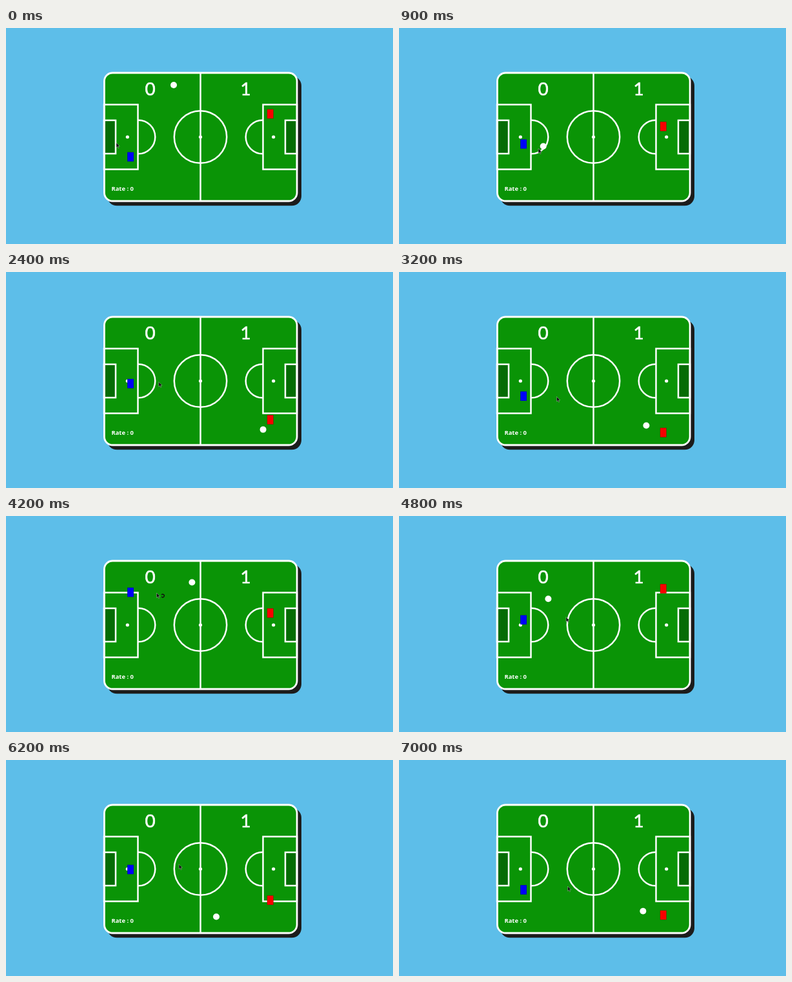
An HTML page with a canvas for the animation above (7100 ms loop, 600 by 337 pixels).

```html
<!DOCTYPE html>
<html lang="en">
<head>
<meta charset="utf-8">
<title>Football pong</title>
<style>
  html, body { margin: 0; width: 100%; height: 100%; overflow: hidden; background: #5dbee9; }
  canvas { display: block; width: 600px; height: 337px; }
</style>
</head>
<body>
<canvas id="stage" width="600" height="337"></canvas>
<script>
const ctx = document.getElementById('stage').getContext('2d');
const LOOP = 7100, STEP = 100, TICK = 5, MID_Y = 170;
const TOP = 76, BOTTOM = 263, CHASE = 2.65;
const GREEN = '#0a9406', DARK_GREEN = '#056c05';

// Ball velocity in px/s from each paddle hit on; walls reflect it.
const shots = [
  { at: 0, vx: -77, vy: -158 },
  { at: 730, vx: 117, vy: 41 },
  { at: 2395, vx: 0, vy: 24 },
  { at: 3040, vx: -95, vy: -136 },
  { at: 5095, vx: 111, vy: 68 },
  { at: 6835, vx: -110, vy: -18 }
];

// Resting points of the player's hand: pointer position and blue paddle height.
const hand = [
  { at: 0, x: 171, y: 179, paddle: 201 },
  { at: 900, x: 216, y: 188, paddle: 181 },
  { at: 1600, x: 229, y: 148.5, paddle: 154.5 },
  { at: 3200, x: 244.5, y: 194.5, paddle: 193.7 },
  { at: 4200, x: 233.5, y: 120, paddle: 119 },
  { at: 4950, x: 262, y: 162, paddle: 167 },
  { at: 5500, x: 273.5, y: 134.5, paddle: 145 },
  { at: 7000, x: 261.5, y: 197, paddle: 202.5 }
];

// The red paddle chases the ball at a rate proportional to its distance.
function playMatch() {
  const frames = [], ball = { x: 260, y: 89 }, dt = TICK / 1000;
  let red = 134, vx, vy;
  for (let t = 0; t < LOOP; t += TICK) {
    if (t % STEP === 0) frames.push({ x: ball.x, y: ball.y, red });
    const hit = shots.find(s => s.at === t);
    if (hit) ({ vx, vy } = hit);
    ball.x += vx * dt;
    ball.y += vy * dt;
    if (ball.y < TOP) vy = Math.abs(vy);
    if (ball.y > BOTTOM) vy = -Math.abs(vy);
    red += (ball.y - red) * CHASE * dt;
  }
  return frames;
}
const match = playMatch();

function handAt(t) {
  const i = Math.max(1, hand.findIndex(p => p.at >= t));
  const a = hand[i - 1], b = hand[i], u = (t - a.at) / (b.at - a.at);
  const ease = u * u * (3 - 2 * u);
  const mix = key => a[key] + (b[key] - a[key]) * ease;
  return { x: mix('x'), y: mix('y'), paddle: mix('paddle') };
}

function disc(x, y, r) {
  ctx.beginPath();
  ctx.arc(x, y, r, 0, Math.PI * 2);
  ctx.fill();
}

function halfPitch() {
  ctx.fillStyle = DARK_GREEN;
  ctx.fillRect(153, 144, 17, 52);
  ctx.strokeRect(152, 144, 18, 52);
  ctx.strokeRect(152, 119.5, 52.5, 101);
  ctx.beginPath();
  ctx.arc(205, MID_Y, 26.3, -Math.PI / 2, Math.PI / 2);
  ctx.stroke();
  ctx.fillStyle = '#fff';
  disc(188.3, MID_Y, 2.6);
}

function drawPitch() {
  ctx.fillStyle = '#5dbee9';
  ctx.fillRect(0, 0, 600, 337);

  ctx.fillStyle = '#1c1c1c';
  ctx.beginPath();
  ctx.roundRect(157, 75, 301, 202.3, 15);
  ctx.fill();

  const field = new Path2D();
  field.roundRect(152.4, 70, 298.7, 200, 13);
  ctx.fillStyle = GREEN;
  ctx.fill(field);

  ctx.strokeStyle = '#fff';
  ctx.lineWidth = 2.5;
  halfPitch();
  ctx.save();
  ctx.translate(603, 0);
  ctx.scale(-1, 1);
  halfPitch();
  ctx.restore();

  ctx.beginPath();
  ctx.moveTo(301.5, 70);
  ctx.lineTo(301.5, 270);
  ctx.stroke();
  ctx.beginPath();
  ctx.arc(301.5, MID_Y, 40.7, 0, Math.PI * 2);
  ctx.stroke();
  disc(301.5, MID_Y, 2.6);

  ctx.lineWidth = 2.8;
  ctx.stroke(field);

  ctx.textAlign = 'center';
  ctx.font = '27.8px Lato, sans-serif';
  ctx.lineWidth = 0.7;
  for (const [text, x] of [['0', 223.5], ['1', 371.5]]) {
    ctx.fillText(text, x, 104.7);
    ctx.strokeText(text, x, 104.7);
  }
  ctx.textAlign = 'left';
  ctx.font = 'bold 9.4px "Open Sans", sans-serif';
  ctx.fillText('Rate : 0', 163.5, 253.8);
}

function drawPaddle(x, y, fill, edge) {
  ctx.fillStyle = edge;
  ctx.fillRect(x, y - 7.3, 9.8, 14.6);
  ctx.fillStyle = fill;
  ctx.fillRect(x + 0.4, y - 6.9, 9, 13.8);
}

function drawCursor(x, y, busy) {
  ctx.beginPath();
  [[0, 0], [0, 7.5], [1.8, 6], [3, 8.7], [4.2, 8.1], [3, 5.5], [5.3, 5.3]]
    .forEach(([dx, dy]) => ctx.lineTo(x + dx, y + dy));
  ctx.closePath();
  ctx.fillStyle = '#111';
  ctx.fill();
  ctx.strokeStyle = 'rgba(220,235,220,.6)';
  ctx.lineWidth = 0.6;
  ctx.stroke();
  if (!busy) return;
  ctx.beginPath();
  ctx.arc(x + 9.5, y + 4.5, 2.3, -2.5, 2.5);
  ctx.strokeStyle = '#111';
  ctx.lineWidth = 1.4;
  ctx.stroke();
}

function render(now) {
  const frame = Math.floor((now % LOOP) / STEP), t = frame * STEP;
  const { x, y, red } = match[frame], player = handAt(t);
  drawPitch();
  drawPaddle(188.2, player.paddle, '#0000f8', '#0202a0');
  drawPaddle(404.8, red, '#f80000', '#8a0a00');
  ctx.fillStyle = '#fff';
  disc(x, y, 5);
  drawCursor(player.x, player.y, t >= 4100 && t < 4400);
}

const start = performance.now();
function tick() {
  render(performance.now() - start);
  requestAnimationFrame(tick);
}
tick();
</script>
</body>
</html>
```
